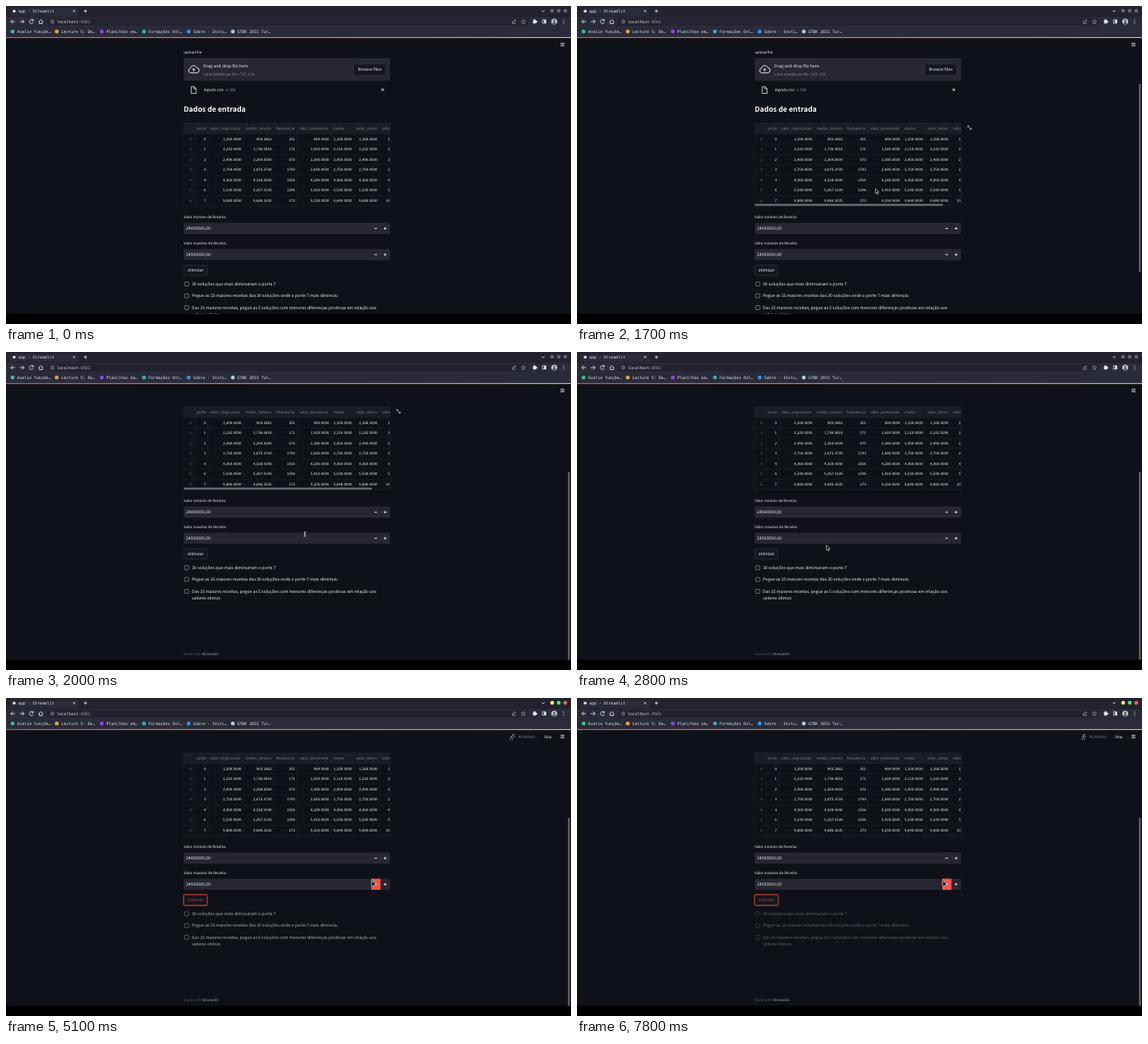
Recreate the animation shown at these times as an HTML page. Size 690x388 px, loop 8000 ms.

```html
<!DOCTYPE html>
<html lang="en">
<head>
<meta charset="utf-8">
<title>app</title>
<style>
html, body { margin: 0; width: 100%; height: 100%; overflow: hidden; background: #000; }
svg { display: block; width: 690px; height: 388px; font-family: "Noto Sans CJK JP", "Noto Sans CJK SC", Lato, sans-serif; text-rendering: geometricPrecision; }
.mono { font-family: "DejaVu Sans Mono", monospace; }
text { white-space: pre; }
</style>
</head>
<body>
<svg id="stage" viewBox="0 0 690 388"></svg>
<script>
const LOOP = 8000, STEP = 100;
const WHITE = '#f2f3f5', GREY = '#85878f', RED = '#f7524f', FIELD = '#262730', LINE = '#252831', PAGE = '#0e1117';
const STRIP = '#22232e', TOOLBAR = '#2a2b39';

// Drawing helpers; text is placed by its vertical centre.
const rect = (x, y, w, h, fill, more = '') => `<rect x="${x}" y="${y}" width="${w}" height="${h}" fill="${fill}" ${more}/>`;
const dot = (x, y, r, fill, more = '') => `<circle cx="${x}" cy="${y}" r="${r}" fill="${fill}" ${more}/>`;
const path = (d, color = WHITE, w = .8, fill = 'none') =>
  `<path d="${d}" fill="${fill}" stroke="${color}" stroke-width="${w}"/>`;
const text = (x, y, s, size = 5.15, fill = WHITE, more = '') =>
  `<text x="${x}" y="${y + size * .36}" font-size="${size}" fill="${fill}" ${more}>${s}</text>`;
const mono = (x, y, s, fill = '#e2e3e6') => text(x, y, s, 4.87, fill, 'class="mono"');
const group = (id, body) => `<g id="${id}">${body}</g>`;
const cross = (x, y, r, color, w) => path(`M${x - r} ${y - r}l${2 * r} ${2 * r}m0 ${-2 * r}l${-2 * r} ${2 * r}`, color, w);
const plus = (x, y, r, w) => path(`M${x - r} ${y}h${2 * r}m${-r} ${-r}v${2 * r}`, WHITE, w);
const END = 'text-anchor="end"', MID = 'text-anchor="middle"';

function browser() {
  const marks = [
    [8, '#35b8a6', 'Avalie funçõe…'], [62, '#e3a04c', 'Lecture 5: De…'], [117, '#8a45e6', 'Planilhas em…'],
    [168.5, '#3fa7b8', 'Formações Onl…'], [223, '#3c8fe0', 'Sobre - Insti…'], [277, '#b9c4dc', 'GTBK 2031 Tur…']];
  return rect(0, 0, 690, 12.5, STRIP) + rect(0, 12.5, 690, 25.6, TOOLBAR) +
    path('M3 12.5q2 0 2 -2v-6q0-2 2-2h79q2 0 2 2v6q0 2 2 2z', 'none', 0, TOOLBAR) +
    dot(10, 6.3, 1.7, '#e8e8ea') + mono(15, 6.2, 'app · Streamlit') +
    cross(83.2, 6.2, 1.3, WHITE, .7) + plus(97, 6.2, 2, .8) +
    path('M654.3 5.4l1.7 1.7l1.7-1.7') +
    path('M11 19h-5.2m2.4-2.4l-2.4 2.4l2.4 2.4M17 19h5.2m-2.4-2.4l2.4 2.4l-2.4 2.4') +
    path('M33 17.6a2.4 2.4 0 1 0 .3 2.2M33.3 16v2h-2') +
    path('M39.8 19.2l2.7-2.4l2.7 2.4M40.7 18.7v2.8h3.6v-2.8') +
    rect(50, 14.4, 588, 9.4, STRIP, 'rx="4.7"') +
    dot(56.5, 19, 2, 'none', 'stroke="#b6b8bd" stroke-width=".6"') + path('M56.5 18.7v1.4m0-2.4v.5', '#b6b8bd', .6) +
    mono(62, 19, 'localhost<tspan fill="#a3a6ac">:8501</tspan>') +
    path('M618.5 18.5v2.8h3.6v-1.2M619.4 19.6q.4-2 2.8-2m-1-1.2l1.2 1.2l-1.2 1.2', '#c8cacf', .6) +
    path('M632 16.4l.8 1.8l1.9.2l-1.4 1.3l.4 1.9l-1.7-1l-1.7 1l.4-1.9l-1.4-1.3l1.9-.2z', '#c8cacf', .5) +
    rect(643.6, 17.2, 4, 4, WHITE, 'rx=".6"') + dot(645.5, 17, .9, WHITE) + dot(648, 19.2, .9, WHITE) +
    rect(655.2, 16.9, 4, 4, 'none', `stroke="${WHITE}" stroke-width=".7"`) + rect(657.2, 16.9, 2, 4, WHITE) +
    dot(669.5, 19, 3.6, '#c3c9d2') + dot(669.5, 18, 1.2, '#4a4442') + path('M667.4 21.6q2.1-4 4.2 0z', '#4a4442', .5, '#4a4442') +
    [17, 19, 21].map(y => dot(681, y, .55, WHITE)).join('') +
    marks.map(([x, color, name]) => dot(x, 31.2, 2.4, color) + mono(x + 5.5, 31.2, name)).join('');
}

function table() {
  const edges = [230.5, 246.5, 290, 327, 355.5, 397, 425, 456.2];
  const heads = ['porte', 'valor_negociacao', 'media_cenario', 'frequencia', 'valor_pessimista', 'media', 'valor_otimo', 'valor'];
  const rows = `0 1,200.0000 903.2862 351 984.0000 1,100.0000 1,168.5000
1 2,232.0000 1,736.0818 171 1,920.0000 2,110.0000 2,232.5000
2 2,490.0000 2,264.8309 670 2,380.0000 2,450.0000 2,490.0000
3 2,750.0000 2,675.3739 1743 2,680.0000 2,750.0000 2,750.0000
4 4,360.0000 4,328.9340 1556 4,280.0000 4,360.0000 4,360.0000
6 5,530.0000 5,267.5139 1296 5,410.0000 5,530.0000 5,530.0000
7 9,880.0000 9,686.3235 273 9,250.0000 9,640.0000 9,680.0000`.split('\n').map(r => r.split(' '));
  const last = ['1,', '2,', '2,', '2,', '4,', '5,', '10,'];
  let s = rect(217, 143, 252, 13, '#1a1c24');
  heads.forEach((h, i) => s += text(edges[i] + 2.7, 149.6, h, 4.5, GREY));
  rows.forEach((row, r) => {
    const y = 162.1 + r * 12.55;
    s += path(`M217 ${y - 6.1}h252`, LINE, .4) + text(225.3, y, r, 4.5, '#6d6f78', MID);
    row.forEach((v, c) => s += text(edges[c + 1] - 2.6, y, v, 4.5, WHITE, END));
    s += text(r < 6 ? 466.3 : 463.8, y, last[r], 4.5);
  });
  s += edges.map(x => path(`M${x} 143v101`, LINE, .4)).join('');
  return `<g clip-path="url(#grid)">${s}</g>` + rect(217, 143, 252, 101, 'none', `stroke="${LINE}" stroke-width=".5"`) +
    group('hoverTools', rect(217, 241.6, 230, 2.2, '#70727a', 'rx="1.1"') +
      path('M477.2 148.2v-1.9h1.9m-1.9 0l4.2 4.2m0-1.9v1.9h-1.9', '#d5d6da', .7));
}

function numberField(y, label, value, id) {
  return text(217, y - 14.3, label, 4.5) + rect(217, y - 6.8, 252, 13.6, FIELD, 'rx="1.4"') + text(220, y, value) +
    rect(446, y - 6.8, 11.4, 13.6, FIELD, `id="${id}"`) + path(`M449.9 ${y}h3.2`, WHITE, .9) + plus(463, y, 1.6, .9);
}

function checks() {
  const items = [[339.2, '30 soluções que mais diminuiram o porte 7'],
    [353.6, 'Pegue as 15 maiores receitas das 30 soluções onde o porte 7 mais diminuiu'],
    [368, 'Das 15 maiores receitas, pegue as 5 soluções com menores diferenças positivas em relação aos']];
  return items.map(([y, s]) => rect(218.2, y - 2.5, 5, 5, PAGE, 'rx=".8" stroke="#a9abb1" stroke-width=".6"') + text(227, y, s)).join('') +
    text(227, 376.6, 'valores otimos');
}

function page() {
  return text(217, 56.4, 'upload file', 4.5) + rect(217, 63.6, 252, 27.6, FIELD, 'rx="1.4"') +
    path('M225.6 81.6a2.9 2.9 0 0 1-.3-5.7a4 4 0 0 1 7.6-.8a3.3 3.3 0 0 1 .3 6.5zM229.2 80v-3.6m-1.6 1.5l1.6-1.6l1.6 1.6', '#e3e4e7', 1) +
    text(241, 73.6, 'Drag and drop file here') + text(241, 83, 'Limit 200MB per file • TXT, CSV', 4.5, '#8d8f98') +
    rect(425, 71, 38.4, 13.2, '#13161d', 'rx="1.4" stroke="#3a3c45" stroke-width=".4"') + text(444.2, 77.6, 'Browse files', 5.15, WHITE, MID) +
    path('M226.2 98.4h3.6l2.4 2.4v5.8h-6zM229.6 98.6v2.4h2.4', WHITE, .8) + text(241.4, 102.4, 'inputs.csv') +
    text(268.2, 102.4, '0.7KB', 4.5, '#8d8f98') + cross(460, 102.2, 1.6, WHITE, .9) +
    text(217, 125.4, 'Dados de entrada', 8.8, '#fafafa', 'font-weight="600"') + table() +
    numberField(271.4, 'Valor minimo de Receita:', '24000000,00', 'minusA') +
    numberField(303.3, 'Valor maximo de Receita:', '24500000,00', 'minusB') +
    rect(216.6, 315.7, 29.3, 13.6, 'none', `id="ring" rx="1.8" stroke="${RED}" stroke-opacity=".5" stroke-width="1.2"`) +
    rect(217.2, 316.2, 28.2, 12.6, '#13161d', 'id="button" rx="1.4" stroke-width=".6"') +
    text(231.3, 322.5, 'otimizar', 5.15, WHITE, `${MID} id="caption"`) + group('checks', checks()) +
    text(217, 444.8, 'Made with <tspan font-weight="600" fill="#74767f">Streamlit</tspan>', 4.4, '#555861');
}

const ARROW = path('M0 0v6l1.5-1.3l1 2.2l1-.5l-1-2.1h2z', '#e8e8e8', .6, '#111');
const BEAM = path('M-1.4-3q1.4 0 1.4 1v4q0 1-1.4 1M1.4-3q-1.4 0-1.4 1v4q0 1 1.4 1', '#e0e0e0', .7);
const HAND = path('M-.6 0q.7-.7 1.2 0v2.2l2.5.7q.6.3.4 1l-.6 2.6h-3.2l-1.8-2.6q.1-.8 1.5 0z', '#e8e8e8', .5, '#111');

// Limb positions of the activity figure, relative to its head.
const POSES = [
  'M-.6 1.4l-1 2.4l1.5 1.4v2.2M-1.6 3.8l-.6 2l-2 .2M-.6 1.6l-2 .4l-.8 1.4M-.4 1.8l1 1.3h1.4',
  'M-.4 1.4l-.6 2.6l2 1l-.4 2.4M-1 4l-1 1.6l-2 1.4M-.4 1.6l-1.6 1.4M-.4 1.8l1.8.6l.8-1',
  'M-.6 1.4l-2.4 1.2l1.6 1.8l-.6 2.6M-.6 1.4l1 1.4h1.6M-3 2.6l-1 2.6l-.4 2',
  'M-.4 1.4v2.8l-1.6 3.2M-.4 4.2l1.6 1.2v2M-.4 1.8l-2.6-1M-.4 1.8l2.4-.8'];

const stage = document.getElementById('stage');
stage.innerHTML = `<defs>
  <clipPath id="view"><rect y="38" width="690" height="337.6"/></clipPath>
  <clipPath id="grid"><rect x="217" y="143" width="252" height="101"/></clipPath>
  <linearGradient id="band"><stop stop-color="#cc5650"/><stop offset="1" stop-color="#c4ba78"/></linearGradient></defs>` +
  rect(0, 0, 690, 388, '#000') +
  `<g clip-path="url(#view)">${rect(0, 38, 690, 338, PAGE) + group('scroll', page()) + rect(0, 38, 690, 16.4, PAGE)}</g>` +
  browser() + rect(0, 37.9, 690, 1.2, 'url(#band)') +
  path('M677.2 45.3h4.8m-4.8 1.7h4.8m-4.8 1.7h4.8', '#dcdde0', .8) +
  group('status', dot(619.7, 44.4, .9, '#8d9097') + `<path id="figure" transform="translate(619.9 44.2)" fill="none" stroke="#8d9097" stroke-width=".9"/>` +
    text(625.5, 47.1, 'RUNNING...', 4.5, '#777a82') + text(661.8, 47.1, 'Stop', 4.5, WHITE, MID)) +
  group('lights', [667, 675, 683].map(x => dot(x, 5.8, 2.4, '#888')).join('')) +
  rect(686.4, 95, 2, 229.5, '#6b6d73', 'id="bar" rx="1"') + group('cursor', '');

const el = id => document.getElementById(id);
const set = (id, attrs) => { for (const k in attrs) el(id).setAttribute(k, attrs[k]); };
const show = (id, on) => set(id, { visibility: on ? 'visible' : 'hidden' });

// Interpolates [time, ...values] keys.
function at(keys, t) {
  const i = keys.findIndex(k => k[0] > t);
  if (i === 0) return keys[0].slice(1);
  if (i < 0) return keys[keys.length - 1].slice(1);
  const [a, b] = [keys[i - 1], keys[i]], p = (t - a[0]) / (b[0] - a[0]);
  return a.slice(1).map((v, n) => v + (b[n + 1] - v) * p);
}

const SCROLL = [[1700, 0], [1800, 20.5], [1900, 54], [2000, 76]];
const FADE = [[4800, 1], [5100, .72], [5500, .36]];
const POINTER = [[300, 555, 197], [600, 555, 197], [700, 545, 197], [800, 545, 197], [1400, 364.4, 222.8], [1900, 364.4, 222.8],
  [2000, 365, 222.2], [2400, 365, 222.2], [3300, 229, 253], [3700, 227.3, 250.6], [4100, 227.3, 250.6], [4700, 447.4, 222.4]];

function draw(t) {
  const [y] = at(SCROLL, t), [px, py] = at(POINTER, t);
  const hover = t >= 3200 && t < 4200, pressed = t >= 3900 && t < 4000, focused = t >= 3900, onMinus = t >= 4700;
  set('scroll', { transform: `translate(0 ${-y})` });
  set('bar', { y: 95 + y * .675 });
  show('bar', t >= 300);
  show('hoverTools', t >= 1100 && t < 2300);
  set('button', { stroke: hover || focused ? '#d8484a' : '#3a3c45', fill: pressed ? RED : '#13161d' });
  set('caption', { fill: pressed ? WHITE : hover || focused ? '#b83f43' : WHITE });
  show('ring', focused);
  set('minusB', { fill: onMinus ? RED : FIELD });
  set('checks', { opacity: at(FADE, t)[0] });
  show('status', t >= 4400);
  set('figure', { d: POSES[Math.floor(t / 200 + 1) % POSES.length] });
  ['#f1f07e', '#50e878', '#f9605c'].forEach((c, i) => el('lights').children[i].setAttribute('fill', focused ? c : '#62646e'));
  show('cursor', t >= 300);
  set('cursor', { transform: `translate(${px} ${py})` });
  const shape = hover || onMinus ? HAND : t >= 2000 && t < 2700 ? BEAM : ARROW;
  if (shape !== draw.shape) el('cursor').innerHTML = draw.shape = shape;
}

const start = performance.now();
function tick() {
  const t = (performance.now() - start) % LOOP;
  draw(Math.floor(t / STEP) * STEP);
  requestAnimationFrame(tick);
}
tick();
</script>
</body>
</html>
```
